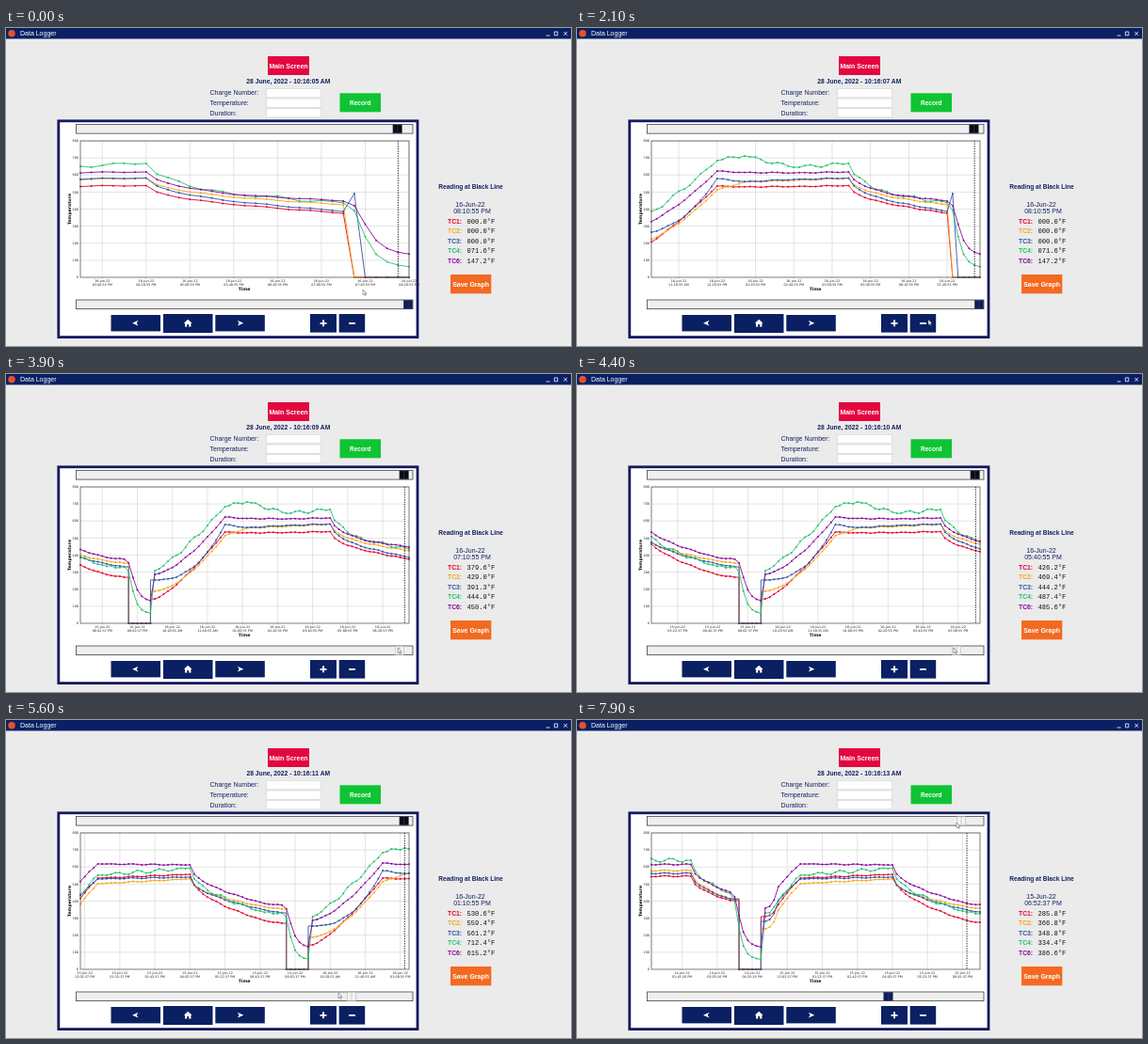
An HTML page for the animation above (8000 ms loop, 600x338 px).

```html
<!DOCTYPE html>
<html lang="en">
<head>
<meta charset="utf-8">
<title>Data Logger</title>
<style>
  html, body { margin: 0; width: 100%; height: 100%; overflow: hidden; background: #ebebeb; }
  svg { display: block; width: 100vw; height: 100vh; }
  text { font-family: "Liberation Sans", Arial, sans-serif; font-size: 7px; fill: #14215f; }
  .b { font-weight: bold; }
  .mid { text-anchor: middle; }
  .btn { fill: #fff; font-weight: bold; text-anchor: middle; }
  .mono { font-family: "Liberation Mono", monospace; font-size: 7.1px; fill: #111; }
  .tick { font-family: "DejaVu Sans", sans-serif; font-size: 3.4px; fill: #222; text-anchor: middle; }
  .axis { font-family: "DejaVu Sans", sans-serif; font-size: 4.6px; font-weight: bold; fill: #111; text-anchor: middle; }
  .navy { fill: #0a2063; }
  .icon { fill: none; stroke: #fff; }
  .field { fill: #fff; stroke: #d2d2d2; stroke-width: .6; }
  .bar { fill: #efefef; stroke: #444; stroke-width: .8; }
  .grid { fill: none; stroke: #d2d2d2; stroke-width: .6; }
  .line { fill: none; stroke-width: .9; stroke-linejoin: round; }
  .dots { fill: none; stroke-width: 2; stroke-linecap: round; }
</style>
</head>
<body>
<svg viewBox="0 0 600 338" preserveAspectRatio="none">
  <rect width="600" height="338" fill="#ebebeb"/>
  <rect class="navy" width="600" height="11.5"/>
  <circle cx="6" cy="5.8" r="3.8" fill="#e8502a"/>
  <text x="15" y="8.3" style="fill:#fff">Data Logger</text>
  <path class="icon" stroke-width=".8" d="M573.5 8h4M582.4 4h3.4v3.8h-3.4zM592.4 4l3.6 3.8m0-3.8l-3.6 3.8"/>

  <rect x="278" y="30" width="44" height="20" fill="#e3063f"/>
  <text class="btn" x="300" y="42.5">Main Screen</text>
  <text class="b mid" id="clock" x="299.8" y="58.8" style="font-size:6.75px"></text>
  <text x="216.5" y="71.2">Charge Number:</text>
  <text x="216.5" y="81.8">Temperature:</text>
  <text x="216.5" y="92.5">Duration:</text>
  <rect class="field" x="276.5" y="64.5" width="58" height="9.3"/>
  <rect class="field" x="276.5" y="75" width="58" height="9.3"/>
  <rect class="field" x="276.5" y="85.6" width="58" height="9.3"/>
  <rect x="354.5" y="69.3" width="43.5" height="20" fill="#0fc433"/>
  <text class="btn" x="376.2" y="81.6" style="font-size:6.5px">Record</text>

  <rect x="55.8" y="98.8" width="381.2" height="229.8" fill="#fff" stroke="#15185f" stroke-width="2.8"/>
  <rect class="bar" x="74.5" y="102.5" width="357.5" height="9.6"/>
  <rect class="bar" x="74.5" y="289" width="357.5" height="9.6"/>
  <g id="topThumb"><rect x="-4.7" y="102.8" width="9.4" height="9"/><path d="M0 103v8.6"/></g>
  <g id="lowThumb"><rect x="-4.7" y="289.3" width="9.4" height="9"/><path d="M0 289.5v8.6"/></g>

  <path class="grid" id="grid"/>
  <g id="series"></g>
  <path id="marker" stroke="#000" stroke-width=".9" stroke-dasharray="1.3 1.3"/>
  <rect x="79" y="120" width="349" height="145" fill="none" stroke="#444" stroke-width=".7"/>
  <g id="yTicks"></g>
  <g id="xTicks"></g>
  <text class="axis" x="253" y="278.6">Time</text>
  <text class="axis" transform="translate(68.5 192.5) rotate(-90)">Temperature</text>

  <g class="navy">
    <rect x="111.5" y="305" width="52.5" height="17.4"/>
    <rect x="167" y="304" width="52.5" height="20"/>
    <rect x="222.3" y="305" width="52.5" height="17.4"/>
    <rect x="323" y="304" width="28" height="19.6"/>
    <rect x="353.7" y="304" width="27.5" height="19.6"/>
  </g>
  <path fill="#fff" d="M134 313.7l6.5-2.9-1.8 2.9 1.8 2.9zM252.3 313.7l-6.5-2.9 1.8 2.9-1.8 2.9zM188.8 313.8l4.4-4 4.4 4h-1.2v3.7h-2.2v-2.5h-2v2.5h-2.2v-3.7z"/>
  <path class="icon" stroke-width="1.8" d="M333.5 313.8h7M337 310.3v7M364 313.8h7"/>

  <text class="b mid" x="493.5" y="170.6" style="font-size:6.6px">Reading at Black Line</text>
  <text class="mid" id="readDate" x="493" y="189.8"></text>
  <text class="mid" id="readTime" x="495" y="196.7"></text>
  <g id="reads"></g>
  <rect x="472" y="262" width="43.3" height="20.3" fill="#f26a21"/>
  <text class="btn" x="493.6" y="274.6">Save Graph</text>

  <path id="cursor" d="M0 0v5.6l1.4-1.2 1 2.1.8-.4-.9-2h1.8z" fill="#fff" stroke="#444" stroke-width=".5"/>
</svg>
<script>
const $ = id => document.getElementById(id);
const two = n => String(n).padStart(2, '0');
const LOOP = 8000, LEFT = 79, RIGHT = 428, BASE = 265, PX = 145 / 800;

// Three furnace runs of ramp, soak and cooling. Marks count ten-minute samples
// back from the newest; bends are the easing powers of the stretch before each mark.
const marks = [138, 129, 121, 118, 113, 92, 75, 71, 64, 48, 43, 34, 24, 16, 6];
const bends = [1, .5, 1, 2.5, .9, 1, .5, 1, 1, 'rise', 1, 1, 1, .5, 1];
// Shutdowns: burner off, logger off, restart.
const gaps = [[129, 127, 121], [71, 70, 64], [6, 5, -1]];

const series = [
  { name: 'TC1', color: '#e4032e', rise: 1.3, wobble: 3,
    keys: [546, 403, 309, 381, 535, 557, 285.8, 270, 143, 535, 530.6, 532, 538, 426.2, 375] },
  { name: 'TC2', color: '#f5a81c', rise: 1.6, wobble: 3,
    keys: [579, 414, 237, 348, 502, 530, 366.8, 353, 188, 513, 559.4, 568, 582, 469.4, 425] },
  { name: 'TC3', color: '#3254a8', rise: 2.4, wobble: 3, spike: 491,
    keys: [563, 412, 281, 403, 530, 541, 348.8, 331, 254, 579, 561.2, 574, 582, 444.2, 386] },
  { name: 'TC4', color: '#25c16f', rise: 1.2, wobble: 11, fall: .1304, floor: 49.2,
    keys: [640, 445, 331, 408, 552, 593, 334.4, 334, 309, 684, 712.4, 645, 668, 487.4, 436] },
  { name: 'TC6', color: '#8a0a9a', rise: 1.5, wobble: 3, fall: .0891, floor: 120.3,
    keys: [615, 452, 359, 485, 618, 612, 386.6, 376, 287, 623, 615.2, 612, 618, 485.6, 447] }
];

function valueAt(sr, s) {
  const gap = gaps.find(([burner, , restart]) => s < burner && s > restart);
  if (gap) {
    const [burner, logger] = gap;
    const hot = sr.keys[marks.indexOf(burner)];
    if (sr.fall) return sr.floor + (hot - sr.floor) / (1 + sr.fall * (burner - s) ** 3);
    if (s === 5 && sr.spike) return sr.spike;
    return s > logger ? hot : 0;
  }
  const ripple = sr.wobble * Math.sin(s * 1.3 + sr.wobble);
  if (s > marks[0]) return sr.keys[0] + ripple;
  const i = Math.max(1, marks.findIndex(m => m <= s));
  const u = (marks[i - 1] - s) / (marks[i - 1] - marks[i]);
  const bend = bends[i] === 'rise' ? sr.rise : bends[i];
  return sr.keys[i - 1] + (sr.keys[i] - sr.keys[i - 1]) * u ** bend + ripple * 4 * u * (1 - u);
}

// Each restart shifts the logger's clock phase.
function stamp(s) {
  const [day, min, sec, from] = s < 65 ? [16, 1220, 55, 0] : s < 122 ? [15, 1192, 37, 69] : [14, 985, 26, 124];
  const m = min - 10 * (s - from), h = Math.floor(m / 60);
  return [`${day}-Jun-22`, `${two(h % 12 || 12)}:${two(m % 60)}:${sec} ${h < 12 ? 'AM' : 'PM'}`];
}

// Linear track through [time, a, b...] keys.
function track(keys, t) {
  let i = 1;
  while (i < keys.length - 1 && keys[i][0] < t) i++;
  const [a, b] = [keys[i - 1], keys[i]];
  const u = Math.min(1, Math.max(0, (t - a[0]) / (b[0] - a[0])));
  return a.slice(1).map((v, j) => v + (b[j + 1] - v) * u);
}
const scroll = [[3600, 0, 427], [4400, 15, 403], [5600, 42, 367], [6500, 68, 332], [6900, 72, 330.5]];
const pointer = [[0, 379, 278], [250, 379, 279], [650, 373, 310], [2700, 373, 310], [2900, 383, 282], [3350, 426, 291],
  [3600, 426, 291], [4400, 400, 291], [5600, 353, 290], [6500, 330, 290], [6950, 330, 291], [7250, 414, 107], [7400, 414, 108], [7900, 403, 109]];

const label = (x, y, s, cls) => `<text class="${cls}" x="${x}" y="${y}">${s}</text>`;
$('series').innerHTML = series.map(s =>
  `<path class="line" stroke="${s.color}"/><path class="dots" stroke="${s.color}"/>`).join('');
const paths = $('series').children;
$('reads').innerHTML = series.map((s, i) => {
  const y = 207.6 + i * 10.6;
  return `<text class="b" x="469" y="${y}" style="fill:${s.color};font-size:6.8px">${s.name}:</text>` + label(489.5, y, '', 'mono');
}).join('');
const reads = $('reads').querySelectorAll('.mono');
for (let v = 0; v <= 800; v += 100)
  $('yTicks').innerHTML += `<text class="tick" style="text-anchor:end" x="77" y="${BASE - v * PX + 1.2}">${v}</text>`;

let shown = '';
function drawChart(count, first) {
  if (shown === count + ':' + first) return;
  shown = count + ':' + first;
  const step = (RIGHT - LEFT) / count;
  const xOf = s => RIGHT - (s - first) * step;
  const point = (s, v) => xOf(s).toFixed(2) + ' ' + (BASE - v * PX).toFixed(2);
  series.forEach((sr, i) => {
    const line = [], dots = [];
    for (let s = first + count, last; s >= first; s--) {
      const v = valueAt(sr, s);
      // Restarts and the earlier shutdowns jump straight up or down.
      if (last > 0 && v === 0 && s > 5) line.push(point(s, last));
      if (last === 0 && v > 0) line.push(point(s + 1, v));
      line.push(point(s, v));
      dots.push(`M${point(s, v)}h0`);
      last = v;
    }
    paths[2 * i].setAttribute('d', 'M' + line.join('L'));
    paths[2 * i + 1].setAttribute('d', dots.join(''));
  });
  const every = Math.ceil(count / 9.5);
  let grid = '', ticks = '';
  for (let y = 120; y < BASE; y += 100 * PX) grid += `M${LEFT} ${y}H${RIGHT}`;
  for (let s = first; s <= first + count; s++) {
    if ((300 - s) % every) continue;
    const x = xOf(s), [day, time] = stamp(s);
    grid += `M${x} 120V267`;
    ticks += label(x, 270, day, 'tick') + label(x, 273.8, time, 'tick');
  }
  $('grid').setAttribute('d', grid);
  $('xTicks').innerHTML = ticks;
}

function setThumb(id, x, held, dark) {
  const g = $(id);
  g.setAttribute('transform', `translate(${x} 0)`);
  g.setAttribute('fill', held ? '#f4f4f4' : dark);
  g.setAttribute('stroke', held ? '#b4b4b4' : '#3a3f5c');
  g.setAttribute('stroke-width', '.6');
}

function render(t) {
  const clicks = Math.min(9, Math.max(0, Math.floor((t - 860) / 230) + 1));
  const count = 30 + 5 * clicks;
  const [pos, thumb] = track(scroll, t);
  const first = Math.round(pos);
  drawChart(count, first);

  const [back, slide] = track([[7400, 1, -.7], [7850, 3, -6]], t);
  const x = RIGHT - back * (RIGHT - LEFT) / count;
  $('marker').setAttribute('d', `M${x} 120V265`);
  const at = first + Math.round(back);
  const [day, time] = stamp(at);
  $('readDate').textContent = day;
  $('readTime').textContent = time;
  series.forEach((s, i) => reads[i].textContent = valueAt(s, at).toFixed(1).padStart(5, '0') + '°F');

  setThumb('topThumb', x + slide, t > 7350, '#0a0a14');
  setThumb('lowThumb', thumb, t > 3450 && t < 7000, '#101c58');
  $('clock').textContent = `28 June, 2022 - 10:16:${two(5 + Math.floor(t / 1000 + .65))} AM`;
  $('cursor').setAttribute('transform', `translate(${track(pointer, t).join(' ')})`);
}

const start = performance.now();
function tick() {
  render((performance.now() - start) % LOOP);
  requestAnimationFrame(tick);
}
tick();
</script>
</body>
</html>
```
